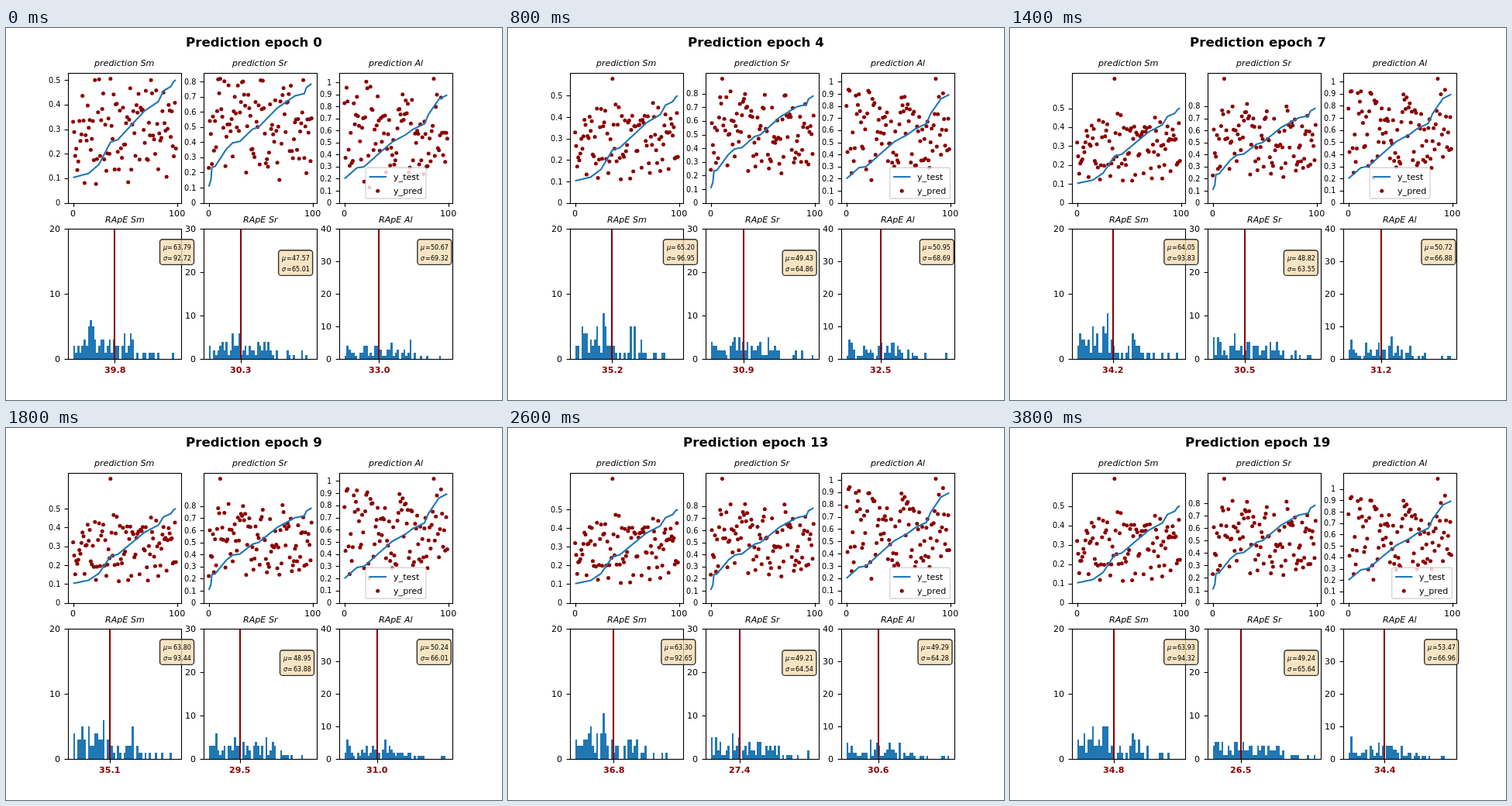
Animation of 640x480 px, one loop 4000 ms. Source, as an HTML page with a canvas:

```html
<!DOCTYPE html>
<html lang="en">
<head>
<meta charset="utf-8">
<title>Prediction by epoch</title>
<style>
html, body { margin: 0; width: 100%; height: 100%; overflow: hidden; background: #fff; }
canvas { display: block; }
</style>
</head>
<body>
<canvas id="stage" width="640" height="480"></canvas>
<script>
const ctx = document.getElementById('stage').getContext('2d');
const BLUE = '#1f77b4', RED = '#8b0000';
const W = 145.88, H = 168, TOP = 57.6, LOW = 259.2;
const EPOCHS = 20, STEP = 200, SAMPLES = 100;
const KEYS = [0, 4, 7, 13, 19];

// top, median, mean and sigma are given at KEYS; curve holds index, value pairs.
// Predictions spread around mid by span; the sample at peak is the highest.
const panels = [
  {
    name: 'Sm', x: 80, ticks: 5, bars: 20, noteAt: 15, mid: .29, span: .2, peak: 36,
    top: [.53, .608, .688, .697, .672],
    median: [39.8, 35.2, 34.2, 36.8, 34.8],
    mean: [63.79, 65.2, 64.05, 63.3, 63.93],
    sigma: [92.72, 96.95, 93.83, 92.65, 94.32],
    curve: [[0, .103], [15, .12], [25, .157], [36, .247], [43, .257], [59, .33], [69, .375],
      [82, .412], [87, .456], [94, .473], [97, .495], [99, .5]]
  },
  {
    name: 'Sr', x: 255.06, ticks: 8, bars: 30, noteAt: 20, mid: .52, span: .36, peak: 11,
    top: [.858, .954, 1.078, 1.077, 1.045],
    median: [30.3, 30.9, 30.5, 27.4, 26.5],
    mean: [47.57, 49.43, 48.82, 49.21, 49.24],
    sigma: [65.01, 64.86, 63.55, 64.54, 65.64],
    curve: [[0, .107], [2, .15], [3, .235], [6, .24], [17, .355], [23, .395], [30, .405],
      [42, .485], [48, .5], [66, .625], [83, .705], [92, .72], [94, .76], [99, .785]]
  },
  {
    name: 'Al', x: 430.12, ticks: 10, bars: 40, noteAt: 30, mid: .58, span: .4, peak: 86,
    top: [1.08, 1.076, 1.073, 1.059, 1.143],
    median: [33, 32.5, 31.2, 30.6, 34.4],
    mean: [50.67, 50.95, 50.72, 49.29, 53.47],
    sigma: [69.32, 68.69, 66.88, 64.28, 66.96],
    curve: [[0, .2], [12, .29], [19, .3], [32, .4], [46, .505], [59, .565], [66, .61],
      [77, .655], [81, .735], [91, .86], [99, .895]]
  }
];

const snap = v => Math.floor(v + .5) + .5;
const noise = n => {
  const s = Math.sin(n * 12.9898) * 43758.5453;
  return (s - Math.floor(s)) * 2 - 1;
};

function lerp(points, at) {
  const i = Math.max(1, points.findIndex(p => p[0] >= at));
  const [x0, y0] = points[i - 1], [x1, y1] = points[i];
  return y0 + (y1 - y0) * (at - x0) / (x1 - x0);
}
const keyed = (values, epoch) => lerp(KEYS.map((k, i) => [k, values[i]]), epoch);

// anchor: 0 left, .5 centre, 1 right; glyphs start on whole pixels.
function text(str, x, y, size, anchor = 0, style = '', color = '#000') {
  ctx.font = `${style} ${size}px "DejaVu Sans", Verdana, sans-serif`;
  ctx.fillStyle = color;
  const left = x - ctx.measureText(str).width * anchor;
  ctx.fillText(str, Math.round(left), Math.round(y));
}

function line(points, color, width) {
  ctx.beginPath();
  points.forEach(p => ctx.lineTo(...p));
  ctx.strokeStyle = color;
  ctx.lineWidth = width;
  ctx.stroke();
}

function dot(x, y) {
  ctx.fillStyle = RED;
  ctx.beginPath();
  ctx.arc(x, y, 2.5, 0, 7);
  ctx.fill();
}

function roundBox(x, y, w, h, r, fill, edge) {
  ctx.globalAlpha = .8;
  ctx.beginPath();
  ctx.roundRect(x, y, w, h, r);
  ctx.fillStyle = fill;
  ctx.fill();
  ctx.strokeStyle = edge;
  ctx.lineWidth = 1.39;
  ctx.stroke();
  ctx.globalAlpha = 1;
}

function frame(x, y, title) {
  const l = snap(x), t = snap(y);
  ctx.strokeStyle = '#000';
  ctx.lineWidth = 1.11;
  ctx.strokeRect(l, t, snap(x + W) - l, snap(y + H) - t);
  text(title, x + W / 2, y - 8.6, 11.11, .5, 'italic');
}

function xTick(x, base, label, style, color) {
  line([[snap(x), base], [snap(x), base + 5.3]], '#000', 1.11);
  text(label, x, base + 17.8, 11.11, .5, style, color);
}

function yTick(x, y, label, size) {
  line([[x - 4.5, snap(y)], [x, snap(y)]], '#000', 1.11);
  text(label, x - 9.7, y + size * .365, size, 1);
}

// Predictions scatter widely at first and settle as training goes on.
function predict(p, epoch, top) {
  const max = top / 1.05;
  const early = .14 * Math.exp(-epoch / 2.5), late = .004 + .016 * (1 - epoch / 19);
  return Array.from({ length: SAMPLES }, (_, i) => {
    if (i === p.peak) return max;
    const seed = i + p.x;
    const settled = p.mid + p.span * (.75 * noise(seed) + .25 * noise(seed + 5000));
    const y = settled + top * (early * noise(seed + 7000) + late * noise(seed + epoch * 101));
    return Math.max(.04, y > max ? 2 * max - y : y);
  });
}

function drawScatter(p, top, pred, truth) {
  const px = i => p.x + (i + 4.95) / 108.9 * W;
  const py = v => TOP + H - v / top * H;
  pred.forEach((v, i) => dot(px(i), py(v)));
  line(truth.map((v, i) => [px(i), py(v)]), BLUE, 2.08);
  frame(p.x, TOP, 'prediction ' + p.name);
  [0, 100].forEach(n => xTick(px(n), TOP + H, n));
  for (let n = 0; n <= p.ticks; n++) yTick(p.x, py(n / 10), n / 10, 9.72);
}

function drawErrors(p, epoch, pred, truth) {
  const base = LOW + H;
  const px = v => p.x + (v + 4.9) / 107.8 * W;
  const py = n => base - n / p.bars * H;
  const counts = Array(49).fill(0);
  pred.forEach((v, i) => {
    const bin = Math.floor(Math.abs(v - truth[i]) / truth[i] * 50);
    if (bin < 49) counts[bin]++;
  });
  ctx.fillStyle = BLUE;
  counts.forEach((n, i) => {
    const l = Math.round(px(i * 2)), t = Math.round(py(n));
    ctx.fillRect(l, t, Math.round(px(i * 2 + 2)) - l, 427 - t);
  });

  const median = keyed(p.median, epoch), mx = Math.round(px(median));
  line([[mx, LOW], [mx, base]], RED, 2.08);
  frame(p.x, LOW, 'RApE ' + p.name);
  xTick(px(median), base, median.toFixed(1), 'bold', RED);
  for (let n = 0; n <= p.bars; n += 10) yTick(p.x, py(n), n, 11.11);

  const mean = keyed(p.mean, epoch), x = px(mean + 22), y = py(p.noteAt);
  roundBox(x - 4.2, y - 28.4, 44, 32.6, 3.5, '#f5deb3', '#000');
  [['μ', mean, 15.5], ['σ', keyed(p.sigma, epoch), .8]].forEach(([sign, value, up]) => {
    text(sign, x, y - up, 8, 0, 'italic');
    text('=', x + 5.7, y - up, 8);
    text(value.toFixed(2), x + 13, y - up, 8);
  });
}

function drawLegend(epoch) {
  const centred = epoch < 2 || (epoch > 5 && epoch < 11);
  const x = centred ? 464.2 : 492.7;
  roundBox(x, 180.2, 77.8, 39.8, 2.2, '#fff', '#ccc');
  line([[x + 4.4, 192], [x + 26.7, 192]], BLUE, 2.08);
  dot(x + 15.5, 210.3);
  text('y_test', x + 35.6, 196, 11.11);
  text('y_pred', x + 35.6, 214, 11.11);
}

function draw(epoch) {
  ctx.fillStyle = '#fff';
  ctx.fillRect(0, 0, 640, 480);
  text('Prediction epoch ' + epoch, 320, 24, 16.67, .5, 'bold');
  for (const p of panels) {
    const top = keyed(p.top, epoch);
    const pred = predict(p, epoch, top);
    const truth = pred.map((_, i) => lerp(p.curve, i));
    drawScatter(p, top, pred, truth);
    drawErrors(p, epoch, pred, truth);
  }
  drawLegend(epoch);
}

const start = performance.now();
function tick() {
  draw(Math.floor((performance.now() - start) / STEP) % EPOCHS);
  requestAnimationFrame(tick);
}
tick();
</script>
</body>
</html>
```
